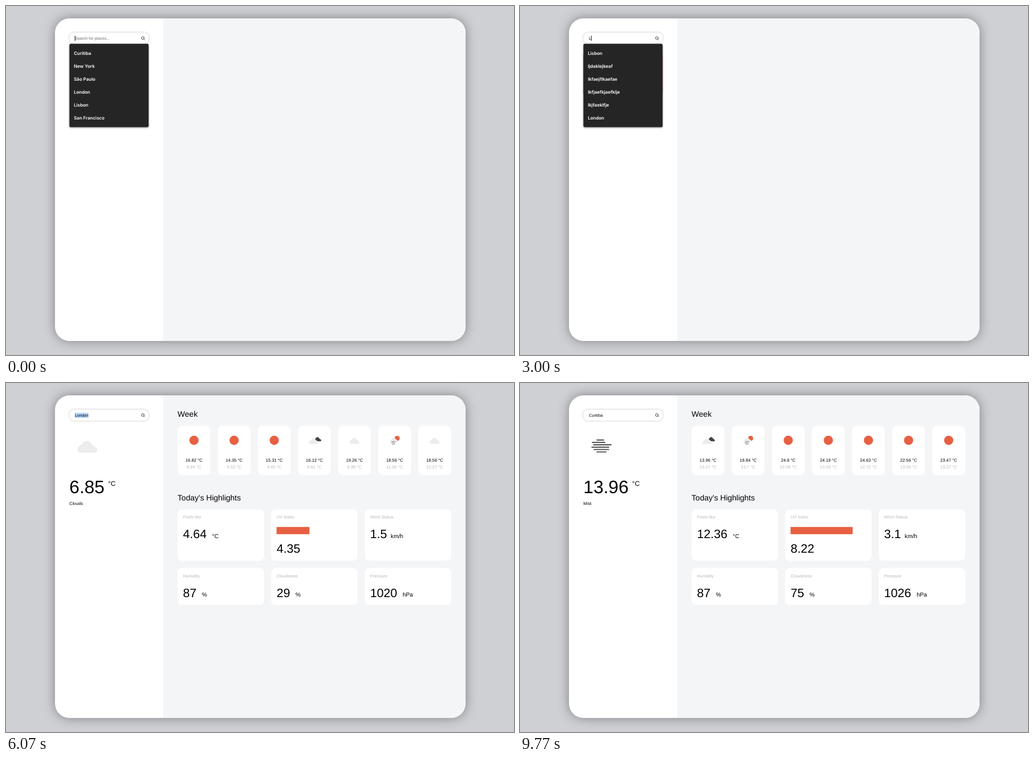
Write an HTML page that moves like this. It is 902 px wide and 621 px high and loops after 9.96 s.

```html
<!DOCTYPE html>
<html lang="en">
<head>
<meta charset="utf-8">
<title>Weather search</title>
<style>
html, body { margin: 0; height: 100%; overflow: hidden; background: #cfd0d4; }
svg { display: block; font-family: "Liberation Sans", Arial, sans-serif; text-rendering: geometricPrecision; }
.panel { filter: drop-shadow(0 0 10px rgba(0,0,0,.38)); }
.search { filter: drop-shadow(0 0 1.6px rgba(0,0,0,.3)); }
.list { filter: drop-shadow(0 1px 1.5px rgba(0,0,0,.45)); }
.list text { font: 600 8px Inter, sans-serif; fill: #fff; }
.error text { fill: #fff; stroke: #fff; stroke-width: .15; }
</style>
</head>
<body>
<svg width="902" height="621" viewBox="0 0 902 621">
  <rect class="panel" x="87" y="22" width="729" height="574" rx="25.6" fill="#fff"/>
  <path d="M279 22H790.4a25.6 25.6 0 0 1 25.6 25.6V570.4a25.6 25.6 0 0 1 -25.6 25.6H279z" fill="#f4f5f7"/>
  <g id="results"></g>
  <g id="side"></g>
  <rect class="search" x="112.6" y="47.2" width="140.6" height="19.8" rx="8" fill="#fff"/>
  <g fill="none" stroke="#333" stroke-width=".9" stroke-linecap="round">
    <circle cx="242.9" cy="57" r="2.4"/><path d="M244.7 58.8l1.4 1.4"/>
  </g>
  <g id="field"></g>
  <g id="list" class="list"></g>
</svg>
<script>
const LOOP = 9960, ORANGE = '#e86042', GREY = '#b9b9b9';
const LEFT = 112.6, TEXT_X = 122.2;

const cities = ['Curitiba', 'New York', 'São Paulo', 'London', 'Lisbon', 'San Francisco'];
const withL = ['Lisbon', 'ljdaklejkeaf', 'lkfaejflkaefae', 'lkfjaefkjaefklje', 'lkjfaeklfje', 'London'];

const london = {
  temp: '6.85', sky: 'Clouds', icon: 'cloud', uv: 4.35,
  max: [16.82, 14.35, 15.31, 16.12, 19.26, 18.56, 18.56],
  min: [6.94, 9.53, 9.45, 9.61, 9.38, 11.05, 12.27],
  icons: ['sun', 'sun', 'sun', 'broken', 'cloud', 'rain', 'cloud'],
  values: ['4.64', '4.35', '1.5', '87', '29', '1020']
};
const curitiba = {
  temp: '13.96', sky: 'Mist', icon: 'mist', uv: 8.22,
  max: [13.96, 19.84, 24.8, 24.19, 24.63, 22.56, 23.47],
  min: [13.07, 13.7, 12.09, 13.03, 12.72, 13.56, 13.37],
  icons: ['broken', 'rain', 'sun', 'sun', 'sun', 'sun', 'sun'],
  values: ['12.36', '8.22', '3.1', '87', '75', '1026']
};
const labels = ['Feels like', 'UV Index', 'Wind Status', 'Humidity', 'Cloudiness', 'Pressure'];
const units = ['°C', '', 'km/h', '%', '%', 'hPa'];

// Typed words with the time of each key
const words = [
  { text: 'kljkaejfkleafje', keys: Array.from({ length: 15 }, (_, i) => 500 + i * 33.5) },
  { text: 'London', keys: [3000, 3130, 3230, 3330, 3470, 3570] },
  { text: 'Curitiba', keys: [6630, 6770, 6870, 6970, 7070, 7130, 7200, 7270] }
];
const loads = [[1300, 2170], [3800, 4670], [7500, 8570]];
const selections = [[2240, 3000], [6070, 6630]];

const within = (t, spans) => spans.find(([a, b]) => t >= a && t < b);
const ctx = document.createElement('canvas').getContext('2d');
ctx.font = '72px "Liberation Sans", Arial, sans-serif';
const width = (s, size) => ctx.measureText(s).width * size / 72;

const text = (x, y, size, s, more = '') => `<text x="${x}" y="${y}" font-size="${size}" ${more}>${s}</text>`;
const rect = (x, y, w, h, fill, r = 0) => `<rect x="${x}" y="${y}" width="${w}" height="${h}" rx="${r}" fill="${fill}"/>`;
const circle = (x, y, r, fill) => `<circle cx="${x}" cy="${y}" r="${r}" fill="${fill}"/>`;
const group = (x, y, k, s) => `<g transform="translate(${x} ${y}) scale(${k})">${s}</g>`;

const cloud = (fill, more = '') =>
  `<path d="M-13 12A6 6 0 0 1 -14 .5A5 5 0 0 1 -9.500 -3A9 9 0 0 1 7 -4Q8 -2 8.500 -1A6 6 0 0 1 14 2.500A5 5 0 0 1 14 12z" fill="${fill}" ${more}/>`;
const bars = [[-8, 4, -10.5], [-16, 6, -6.3], [-14, 17, -2], [-17, 13, 2.2], [-13, 13, 6.4], [-8, 8, 10.6]];
const drops = [[-8, 5], [-3, 4], [2, 5], [-10, 9], [-5, 9], [0, 10], [-7, 14], [-2, 14]];
const icons = {
  sun: circle(0, 0, 16.4, ORANGE),
  cloud: cloud('#ececec'),
  broken: group(12, -5, .72, cloud('#444')) +
    group(-3, 2, .98, cloud('#ececec', 'stroke="#fff" stroke-width="2"')),
  rain: circle(9, -7, 9, ORANGE) +
    group(-3, -2, .8, cloud('#ececec', 'stroke="#fff" stroke-width="2"')) +
    drops.map(([x, y]) => circle(x, y, 1.5, '#444')).join(''),
  mist: bars.map(([a, b, y]) => `<path d="M${a} ${y}H${b}" stroke="#484848" stroke-width="1.9" stroke-linecap="round"/>`).join('')
};

function drawResults(data, t) {
  const open = t >= 5200, dy = open ? 0 : -32;
  let s = text(304.6, 60.3, 14, 'Week');
  data.icons.forEach((name, i) => {
    const x = 304.6 + i * 71.23, mid = x + 29.2;
    const ready = t >= (name === 'cloud' ? 5500 : 5200);
    const y = ready ? 0 : -32;
    s += rect(x, 76.3, 58.4, 87.5 + dy, '#fff', 8);
    if (ready) s += group(mid, 102, .5, icons[name]);
    s += text(mid, 140.2 + y, 7.7, data.max[i] + ' °C', 'text-anchor="middle"');
    s += text(mid, 152.3 + y, 7.7, data.min[i] + ' °C', `text-anchor="middle" fill="${GREY}"`);
  });
  let cards = text(304.6, 208.8, 14, "Today's Highlights");
  labels.forEach((label, i) => {
    const x = 304.6 + i % 3 * 166.2, top = i < 3 ? 225 : 329.3, in_x = x + 9.6;
    const base = top + (i === 1 ? 76.8 : 51.4), value = data.values[i];
    cards += rect(x, top, 153.4, i < 3 ? 91.3 : 65.7, '#fff', 8);
    cards += text(in_x, top + 16.3, 7.7, label, `fill="${GREY}"`);
    if (i === 1) cards += rect(in_x, 256.2, data.uv * 13.42, 12.8, ORANGE);
    cards += text(in_x, base, 21.6, value);
    cards += text(in_x + width(value, 21.6) + (i === 2 ? 6.4 : 9.6), base - .3, 10.3, units[i]);
  });
  return s + group(0, dy, 1, cards);
}

function drawToday(data, open) {
  const dy = open ? 0 : -64;
  return (open ? group(144.6, 112, 1, icons[data.icon]) : '') +
    text(LEFT, 196.3 + dy, 32, data.temp) +
    text(LEFT + width(data.temp, 32) + 6.4, 182.8 + dy, 12, '°C') +
    text(LEFT, 217 + dy, 7.7, data.sky);
}

function drawLoader(t) {
  const swing = Math.abs(t / 400 % 2 - 1);
  return [171, 183, 195].map((x, i) =>
    circle(x, 114.5, 2.4 + 1.6 * (i === 1 ? 1 - swing : swing), '#ccc')).join('');
}

const errorCard = `<g class="error" text-anchor="middle">
  ${rect(LEFT, 79.5, 140.6, 83, '#c92424', 8)}
  <path d="M179.500 93.800H186.500L191.200 98.500V105.500L186.500 110.200H179.500L174.800 105.500V98.500z
    M183 98V102.300M183 105.500V105.700" fill="none" stroke="#fff" stroke-width="1.7" stroke-linecap="round" stroke-linejoin="round"/>
  ${text(183, 132.6, 7, 'ERROR! NO PLACE WITH THAT')}
  ${text(183, 145.3, 7, 'NAME! PLEASE TRY AGAIN!')}</g>`;

function drawSide(t) {
  const load = within(t, loads);
  if (load) return drawLoader(t - load[0]);
  if (t >= 8570) return drawToday(curitiba, t >= 8700);
  if (t >= 4670) return drawToday(london, t >= 5200);
  return t >= 2170 ? errorCard : '';
}

function typed(t) {
  const word = words.filter(w => t >= w.keys[0]).pop();
  if (!word) return { query: '', last: -230 };
  const count = word.keys.filter(k => t >= k).length;
  return { query: word.text.slice(0, count), last: word.keys[count - 1] };
}

function drawField(t, query, last) {
  const w = width(query, 7.2), selected = within(t, selections);
  const caret = !selected && (t - last) % 1000 < 500;
  return (selected ? rect(TEXT_X, 53, w, 9, '#b4d5fe') : '') +
    text(TEXT_X, 60.1, 7.2, query || 'Search for places...', query ? '' : 'fill="#6b6b6b"') +
    (caret ? rect(TEXT_X + w, 53, .9, 9, '#000') : '');
}

function drawList(query) {
  const items = query === '' ? cities : query === 'L' ? withL
    : cities.filter(c => c.startsWith(query) && c !== query);
  if (!items.length) return '';
  return rect(LEFT, 67.3, 140.6, 10.2 + 23 * items.length, '#252525', 2.5) +
    items.map((s, i) => text(120.4, 87.1 + 23.03 * i, 8, s)).join('');
}

const shown = {};
function put(id, markup) {
  if (shown[id] !== markup) document.getElementById(id).innerHTML = shown[id] = markup;
}

const start = performance.now();
function frame() {
  const t = (performance.now() - start) % LOOP;
  const { query, last } = typed(t);
  put('results', t < 4670 ? '' : drawResults(t < 8570 ? london : curitiba, t));
  put('side', drawSide(t));
  put('field', drawField(t, query, last));
  put('list', drawList(query));
  requestAnimationFrame(frame);
}
frame();
</script>
</body>
</html>
```
